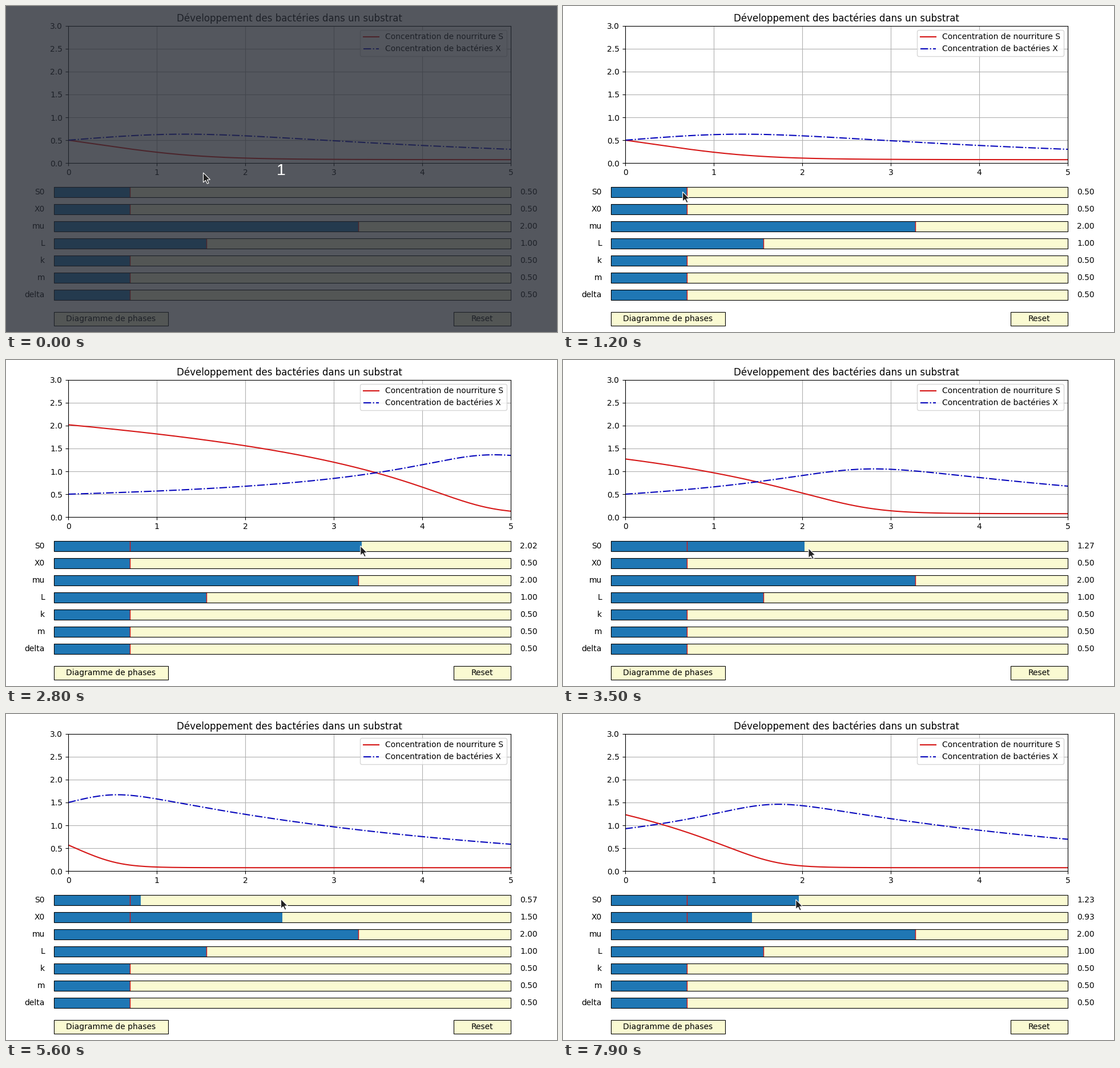
A matplotlib script that plays this animation: 965 px wide and 571 px high, repeating every 8000 ms.

```python
import numpy as np
import matplotlib.pyplot as plt
from matplotlib.animation import FuncAnimation
from matplotlib.patches import Polygon, Rectangle

W, H, DPI = 965, 571, 100
FRAMES, INTERVAL = 80, 100
CREAM, FILL, RED, BLUE = "lightgoldenrodyellow", "#1f77b4", "#d61616", "#0606bc"

# Slider geometry in pixels, y measured upwards
LEFT, WIDTH, TOP, STEP, THICK = 84, 800, 236, 30, 18
UNIT = WIDTH / 3

PARAMS = dict(S0=0.5, X0=0.5, mu=2.0, L=1.0, k=0.5, m=0.5, delta=0.5)

# Pointer travel without a pressed button: first frame, last frame, dx, dy
START = (345.5, 292)
HOPS = [(4, 7, -48.5, 21), (8, 12, -87.5, 12.5), (42, 44, -16, 26), (70, 73, -96, -19)]
# Slider drags: first frame, last frame, name, change, easing power, pointer dy
DRAGS = [(16, 28, "S0", 1.55, 1.293, 0), (29, 40, "S0", -1.45, 0.922, 8.5),
         (48, 61, "X0", 1.36, 1.391, -50), (62, 70, "X0", -0.934, 2.17, 34),
         (74, 79, "S0", 0.664, 1, 0)]
CLICK = 15      # frame of the first press, just left of the S0 mark
LAG = 0.2       # the pointer trails the dragged bar, in frames

ARROW = np.array([(0, 0), (0, 17), (4, 13.3), (7, 19.3), (9.6, 18.2),
                  (6.8, 12.3), (12, 12.1)])


def ease(frame, start, end, power=1):
    u = np.clip((frame - start) / (end - start), 0, 1)
    return 1 - (1 - u) ** power


def slider_values(frame):
    values = dict(PARAMS)
    if frame >= CLICK:
        values["S0"] -= 0.03
    for start, end, name, change, power, _ in DRAGS:
        values[name] += change * ease(frame, start, end, power)
    return values


def pointer_tip(frame):
    tip = np.array(START, float)
    for start, end, dx, dy in HOPS:
        tip += np.array([dx, dy]) * ease(frame, start, end)
    for start, end, _, change, power, dy in DRAGS:
        tip += np.array([change * UNIT, dy]) * ease(frame - LAG, start, end, power)
    return tip


def simulate(t, S0, X0, mu, L, k, m, delta):
    """Growth with substrate inhibition and recycled dead matter (RK4)."""
    def rate(y):
        s, x = y
        growth = mu * s / (k + s + s * s / L)
        return np.array([(delta * m - growth) * x, (growth - m) * x])

    h = t[1] - t[0]
    path = [np.array([S0, X0])]
    for _ in t[1:]:
        y = path[-1]
        a = rate(y)
        b = rate(y + h / 2 * a)
        c = rate(y + h / 2 * b)
        d = rate(y + h * c)
        path.append(y + h / 6 * (a + 2 * b + 2 * c + d))
    return np.array(path).T


def pixel_axes(zorder):
    ax = fig.add_axes([0, 0, 1, 1], zorder=zorder)
    ax.set(xlim=(0, W), ylim=(0, H))
    ax.axis("off")
    return ax


def box(x, y, w, h, **style):
    return panel.add_patch(Rectangle((x, y), w, h, **style))


def framed_box(x, y, w, h):
    box(x, y, w, h, fc=CREAM, lw=0)
    box(x, y, w, h, fc="none", ec="black", lw=0.8, zorder=3)


def slider(row, name, value):
    y = TOP - row * STEP
    mid = y + THICK / 2
    mark = LEFT + UNIT * value
    framed_box(LEFT, y, WIDTH, THICK)
    bar = box(LEFT, y, UNIT * value, THICK, fc=FILL, lw=0, zorder=1.5)
    panel.plot([mark, mark], [y, y + THICK], color=RED, lw=1, zorder=2,
               solid_capstyle="butt")
    panel.text(LEFT - 16, mid, name, ha="right", va="center")
    label = panel.text(LEFT + WIDTH + 16, mid, f"{value:.2f}", va="center")
    return bar, label


def button(x, w, name):
    framed_box(x, 11, w, 24)
    panel.text(x + w / 2, 23, name, ha="center", va="center")


plt.rcParams["font.family"] = "DejaVu Sans"
plt.rcParams["font.size"] = 10
fig = plt.figure(figsize=(W / DPI, H / DPI), dpi=DPI, facecolor="white")

panel = pixel_axes(0)
sliders = {name: slider(row, name, value)
           for row, (name, value) in enumerate(PARAMS.items())}
button(84, 200, "Diagramme de phases")
button(784, 100, "Reset")

t = np.linspace(0, 5, 201)
ax = fig.add_axes([109 / W, 296 / H, 775 / W, 240 / H], zorder=1)
line_s, = ax.plot(t, t, color=RED, lw=1.5, label="Concentration de nourriture S")
line_x, = ax.plot(t, t, "-.", color=BLUE, lw=1.5, label="Concentration de bactéries X")
ax.set(xlim=(0, 5), ylim=(0, 3), xticks=range(6), yticks=np.arange(0, 3.5, 0.5))
ax.set_title("Développement des bactéries dans un substrat", fontsize=12)
ax.grid(True)
ax.legend(loc="upper right")

top = pixel_axes(2)
shade = top.add_patch(Rectangle((0, 0), W, H, fc=(0.149, 0.165, 0.2), alpha=0.79, lw=0))
count = top.text(481.5, 275, "1", color="white", ha="center", va="baseline",
                 family="Liberation Sans", fontsize=20.5)
pointer = top.add_patch(Polygon(ARROW, fc="#222222", ec="white", lw=0.8, zorder=4))


def draw(frame):
    values = slider_values(frame)
    for name, (bar, label) in sliders.items():
        bar.set_width(UNIT * values[name])
        label.set_text(f"{values[name]:.2f}")

    s, x = simulate(t, **values)
    line_s.set_ydata(s)
    line_x.set_ydata(x)

    pointer.set_xy((pointer_tip(frame) + ARROW) * (1, -1) + (0, H))
    shade.set_visible(frame == 0)
    count.set_visible(frame == 0)
    return line_s, line_x, pointer


anim = FuncAnimation(fig, draw, frames=FRAMES, interval=INTERVAL,
                     init_func=lambda: draw(0), repeat=True, repeat_delay=0)
plt.show()
```
